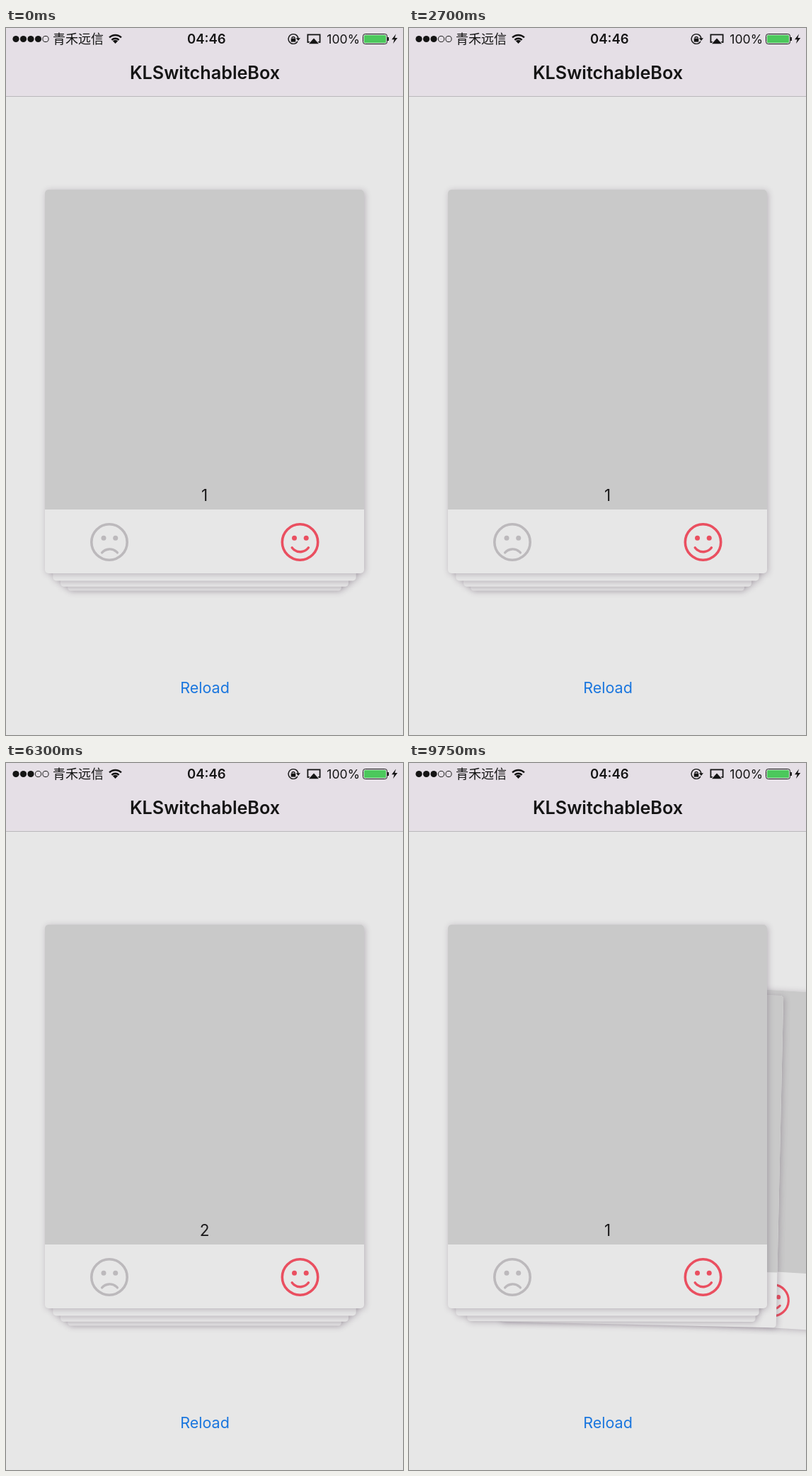
Animation, 561 px wide and 997 px high, one loop 9900 ms. Source, as an HTML page with a canvas:

```html
<!DOCTYPE html>
<html lang="en">
<head>
<meta charset="utf-8">
<title>Card stack</title>
<style>
  html, body { margin: 0; width: 100%; height: 100%; overflow: hidden; background: #e7e7e7; }
  canvas { display: block; width: 561px; height: 997px; }
</style>
</head>
<body>
<canvas id="stage" width="561" height="997"></canvas>
<script>
const ctx = document.getElementById('stage').getContext('2d');
const LOOP = 9900, STEP = 150;
const W = 561, H = 997, CX = 280.5, CY = 498.5;
const CARD_W = 451, CARD_H = 541, PHOTO_H = 451, STACK = 5;
const TILT = Math.PI / 8, FLY = W * 1.5, FLY_TIME = 500, STAGGER = 50;
const EXIT_START = 8530, EMPTY_AT = 9150, ENTER_START = 9177;
const SANS = 'Inter, Roboto, sans-serif';
const INK = '#141414', PAPER = '#e7e7e7', BAR = '#e5dfe6', GREY = '#bcb9bc', RED = '#ea4f60';

const clamp = (v, lo, hi) => Math.min(hi, Math.max(lo, v));
const mix = (a, b, u) => a + (b - a) * u;
const ease = u => (1 - Math.cos(Math.PI * clamp(u, 0, 1))) / 2;

// Travel of the dragged card over u = 0..1, for a drag to the right.
const PULL = 189, THROW = 756;
const pull = u => PULL * (1 - (1 - u) ** 3);
const back = u => PULL * (1 - ease(u));
const toss = u => THROW * u;

const gestures = [
  { start: 750, end: 1800, span: 900, side: -1, card: 1, move: pull, rise: 0.775 },
  { start: 1800, end: 2700, span: 900, side: -1, card: 1, move: back, rise: 0.775 },
  { start: 3000, end: 4050, span: 900, side: 1, card: 1, move: pull, rise: 0.775 },
  { start: 4050, end: 4950, span: 900, side: 1, card: 1, move: back, rise: 0.775 },
  { start: 5700, end: 6300, span: 600, side: -1, card: 1, move: toss, rise: 0.66 },
  { start: 7050, end: 7950, span: 900, side: 1, card: 2, move: toss, rise: 0.66 }
];

function dragAt({ start, span, side, move, rise }, t) {
  const travel = move(clamp((t - start) / span, 0, 1));
  return [side * travel, -rise * travel];
}

function slot(k) {
  k = clamp(k, 0, 3);
  return { x: CX, y: CY + 25.5 * k - 1.5 * k * k, scale: 0.95 ** k, angle: 0 };
}

// u = 0 rests in the slot, u = 1 is off stage on the given side.
function flyPose(k, u, side) {
  const rest = slot(k);
  return {
    x: CX + side * FLY * u, y: mix(rest.y, CY, u),
    scale: mix(rest.scale, 1, u), angle: side * TILT * u
  };
}

function dragPose(dx, dy, progress) {
  const strength = dx / W, grown = 1 + 0.75 * progress;
  return {
    x: CX + dx, y: CY + dy,
    scale: Math.max(1 - Math.abs(strength) / 4, 0.93),
    angle: TILT * clamp(strength, -0.427, 0.427),
    sad: dx < 0 ? grown : 1,
    happy: dx > 0 ? grown : 1
  };
}

function text(str, x, y, font, color = INK, align = 'center') {
  ctx.font = font;
  ctx.fillStyle = color;
  ctx.textAlign = align;
  ctx.fillText(str, x, y);
}

function disc(x, y, r, color = INK) {
  ctx.fillStyle = color;
  ctx.beginPath();
  ctx.arc(x, y, r, 0, 7);
  ctx.fill();
}

function arc(x, y, r, from, to, width, color = INK) {
  ctx.strokeStyle = color;
  ctx.lineWidth = width;
  ctx.beginPath();
  ctx.arc(x, y, r, from, to);
  ctx.stroke();
}

function box(x, y, w, h, r, color) {
  ctx.fillStyle = color;
  ctx.beginPath();
  ctx.roundRect(x, y, w, h, r);
  ctx.fill();
}

// Isosceles triangle with its apex at (x, y); a negative height points down.
function triangle(x, y, half, height, color = INK) {
  ctx.fillStyle = color;
  ctx.beginPath();
  ctx.moveTo(x, y);
  ctx.lineTo(x + half, y + height);
  ctx.lineTo(x - half, y + height);
  ctx.fill();
}

function face(x, y, scale, happy) {
  const color = happy ? RED : GREY;
  ctx.save();
  ctx.translate(x, y);
  ctx.scale(scale, scale);
  ctx.lineCap = 'round';
  arc(0, 0, 25.2, 0, 7, 3.6, color);
  disc(-8, -5.7, 3.5, color);
  disc(8.7, -5.7, 3.5, color);
  if (happy) arc(0.3, -0.8, 14.5, 0.64, Math.PI - 0.64, 3.4, color);
  else arc(0.5, 24.4, 14.5, Math.PI + 0.72, -0.72, 3.4, color);
  ctx.restore();
}

function drawCard(number, { x, y, scale, angle, sad = 1, happy = 1 }) {
  const left = -CARD_W / 2, top = -CARD_H / 2;
  ctx.save();
  ctx.translate(x, y);
  ctx.rotate(angle);
  ctx.scale(scale, scale);
  ctx.shadowColor = 'rgba(75, 55, 80, 0.3)';
  ctx.shadowBlur = 8;
  ctx.shadowOffsetX = ctx.shadowOffsetY = 1.5;
  box(left, top, CARD_W, CARD_H, 5, PAPER);
  ctx.shadowColor = 'transparent';
  box(left, top, CARD_W, PHOTO_H, [5, 5, 0, 0], '#c9c9c9');
  text(number, 0, 168.5, '22.5px ' + SANS, '#1c1a1c');
  face(-134.5, 226.5, sad, false);
  face(135, 226.5, happy, true);
  ctx.restore();
}

function drawReload(t) {
  const entering = t >= EMPTY_AT;
  for (let k = STACK - 1; k >= 0; k--) {
    const start = (entering ? ENTER_START : EXIT_START) + k * STAGGER;
    const u = ease((t - start) / FLY_TIME);
    if (entering) drawCard(k + 1, flyPose(k, 1 - u, 1));
    else drawCard(k + 3, flyPose(k, u, -1));
  }
}

function drawStack(t) {
  const gesture = gestures.find(g => t < g.end);
  const top = gesture ? gesture.card : 3;
  const [dx, dy] = gesture ? dragAt(gesture, t) : [0, 0];
  const progress = clamp(Math.abs(dx) / CX, 0, 1);
  const hidden = progress > 0 ? 0 : 1;
  for (let k = STACK - 1 - hidden; k > 0; k--) drawCard(top + k, slot(k - progress));
  drawCard(top, dragPose(dx, dy, progress));
}

function drawSignal(bars) {
  for (let i = 0; i < 5; i++) {
    const x = 14 + i * 10.5;
    if (i < bars) disc(x, 15.5, 4.6);
    else arc(x, 15.5, 4.1, 0, 7, 1);
  }
}

function drawWifi(x, y) {
  const up = -Math.PI / 2;
  ctx.lineCap = 'butt';
  for (let i = 0; i < 3; i++) arc(x, y, 2.6 + i * 4.7, up - 0.78, up + 0.78, i ? 2.4 : 5.2);
}

function drawLock(x, y) {
  arc(x, y, 6.9, 0.5, 2 * Math.PI - 0.1, 1.4);
  triangle(x + 6.9, y + 2.5, 3.1, -3.8);
  box(x - 3.3, y - 0.9, 6.6, 5, 0, INK);
  arc(x, y - 0.9, 2.1, Math.PI, 0, 1.3);
}

function drawMirror(x, y) {
  ctx.strokeStyle = INK;
  ctx.lineWidth = 1.8;
  ctx.strokeRect(x - 8.6, y - 5.1, 17.2, 10.6);
  triangle(x, y - 1.5, 9, 10, BAR);
  triangle(x, y, 7, 7.7);
}

function drawBattery(x, y) {
  ctx.strokeStyle = INK;
  ctx.lineWidth = 1;
  ctx.beginPath();
  ctx.roundRect(x, y, 34, 14, 3);
  ctx.stroke();
  box(x + 1.5, y + 1.5, 31, 11, 1.5, '#4cc85c');
  box(x + 34.7, y + 4.5, 1.8, 5, 0, INK);
  ctx.fillStyle = INK;
  ctx.fill(new Path2D(`M${x + 46.5} ${y}l-6 7.7h3.6l-1.6 5.8 6.2-8h-3.8z`));
}

function drawBars(t) {
  box(0, 0, W, 96, 0, BAR);
  box(0, 96, W, 1, 0, '#bab8bb');
  text('KLSwitchableBox', 281, 72, '600 25.2px ' + SANS);
  drawSignal(t < 1800 ? 4 : 3);
  text('青禾远信', 66, 22, '18px "Noto Sans CJK SC", "Noto Sans CJK", sans-serif', INK, 'left');
  drawWifi(154.5, 22);
  text('04:46', 283.3, 22, '600 18.5px ' + SANS);
  drawLock(406, 15.5);
  drawMirror(435, 14.5);
  text('100%', 500, 22, '17.6px ' + SANS, INK, 'right');
  drawBattery(504.5, 8.5);
}

function draw(t) {
  box(0, 0, W, H, 0, PAPER);
  text('Reload', CX + 0.5, 938, '21.5px ' + SANS, '#1a76de');
  if (t < EXIT_START) drawStack(t);
  else drawReload(t);
  drawBars(t);
}

function tick(now) {
  draw(Math.floor((now % LOOP) / STEP) * STEP);
  requestAnimationFrame(tick);
}
requestAnimationFrame(tick);
</script>
</body>
</html>
```
